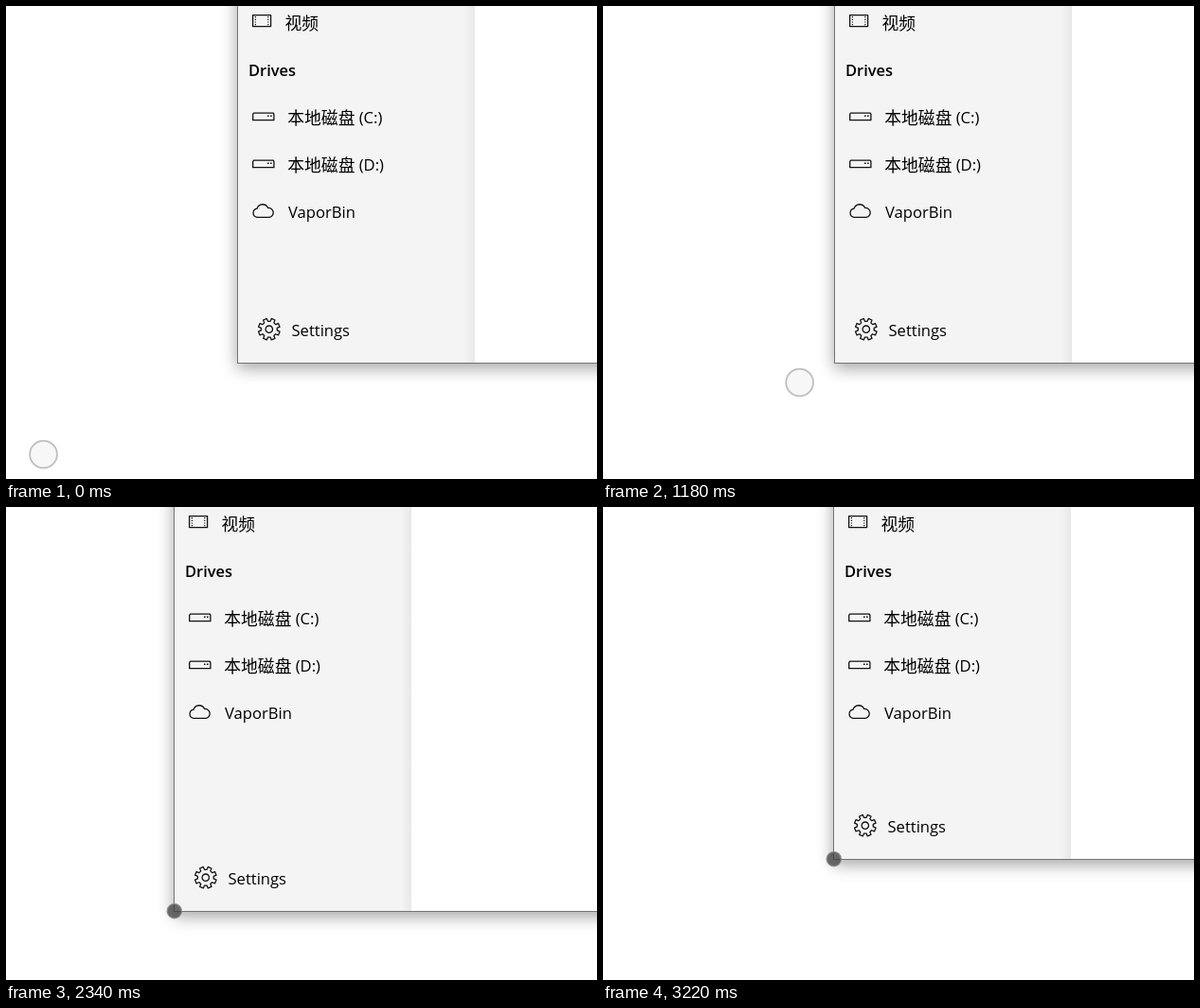
An HTML page for the animation above (3.6 s loop, 624x500 px).

```html
<!DOCTYPE html>
<html lang="zh-CN">
<head>
<meta charset="utf-8">
<title>Window resize</title>
<style>
  html, body { margin: 0; width: 100%; height: 100%; overflow: hidden; background: #fff; }
  #stage { position: relative; width: 624px; height: 500px; overflow: hidden; }
  #win {
    position: absolute; left: 0; top: -100px; width: 900px; box-sizing: border-box;
    background: #fff; border: 1px solid #747474;
    box-shadow: 0 5px 16px rgba(0, 0, 0, .36);
  }
  #side {
    width: 250px; height: 100%;
    background: linear-gradient(90deg, #f4f4f4 238px, #e8e8e8 250px);
  }
  svg { position: absolute; left: 0; top: 0; overflow: visible; }
  text { font: 16.6px "Open Sans", "Noto Sans", sans-serif; fill: #000; }
  .cjk { font: 300 17.8px "Noto Sans CJK SC", "Noto Sans CJK JP", sans-serif; }
  .head { font-size: 16.4px; font-weight: 600; }
  .icon { fill: none; stroke: #111; stroke-width: 1.3; stroke-linejoin: round; }
</style>
</head>
<body>
<div id="stage">
  <div id="win"><div id="side"></div></div>
  <svg width="624" height="500">
    <defs>
      <g id="drive" class="icon">
        <path d="M17.6 1.2H38.2L38.9 2.4V8.7H16.7V2.4Z"/>
        <path d="M32 4.2h1.6M35 4.2h1.6" stroke-width="1.5"/>
      </g>
    </defs>
    <g id="items">
      <g class="icon">
        <rect x="16.6" y="9.6" width="19" height="12"/>
        <path d="M19.4 11v10M32.8 11v10" stroke-width="1.2" stroke-dasharray="1.2 1.5"/>
      </g>
      <text class="cjk" x="50.5" y="24.6">视频</text>
      <text class="head" x="12.1" y="74">Drives</text>
      <use href="#drive" y="112"/>
      <text class="cjk" x="53.3" y="124.6">本地磁盘</text>
      <text x="128.7" y="124">(C:)</text>
      <use href="#drive" y="162"/>
      <text class="cjk" x="53.3" y="174.6">本地磁盘</text>
      <text x="128.7" y="174">(D:)</text>
      <path class="icon" d="M21 223.3A4.6 4.6 0 0 1 21 214.2A6.2 6.2 0 0 1 32.6 213.4A5 5 0 0 1 34 223.3Z"/>
      <text x="54" y="224">VaporBin</text>
      <g id="settings">
        <g class="icon" transform="translate(33.8 -35.3)">
          <path id="gear"/>
          <circle r="3.7"/>
        </g>
        <text x="57.5" y="-28">Settings</text>
      </g>
    </g>
    <circle id="dot"/>
  </svg>
</div>
<script>
  const LOOP = 3600;
  const $ = id => document.getElementById(id);
  const win = $('win'), items = $('items'), settings = $('settings'), dot = $('dot');

  // Corner of the window while dragged: time, x, y
  const drag = [
    [1840, 244, 377], [1980, 212, 402], [2340, 177.4, 427.4], [2390, 176.6, 427.8],
    [2530, 173, 430], [2880, 203.3, 403.3], [2960, 220.6, 388.4], [3220, 243, 372]
  ];

  const clamp = v => Math.min(1, Math.max(0, v));
  const mix = (a, b, p) => a + (b - a) * p;

  // Monotone cubic interpolation through one column of the key table
  function track(keys, col, t) {
    const last = keys.length - 1;
    if (t <= keys[0][0]) return keys[0][col];
    if (t >= keys[last][0]) return keys[last][col];
    const slope = i => (keys[i + 1][col] - keys[i][col]) / (keys[i + 1][0] - keys[i][0]);
    const tangent = i => {
      if (i === 0 || i === last) return 0;
      const a = slope(i - 1), b = slope(i);
      return a * b > 0 ? 2 * a * b / (a + b) : 0;
    };
    let i = 0;
    while (t > keys[i + 1][0]) i++;
    const h = keys[i + 1][0] - keys[i][0];
    const u = (t - keys[i][0]) / h, v = 1 - u;
    return v * v * (1 + 2 * u) * keys[i][col] + u * u * (1 + 2 * v) * keys[i + 1][col]
      + h * u * v * (v * tangent(i) - u * tangent(i + 1));
  }

  // The pointer's approach enters the loop already slightly under way
  const sine = t => (1 - Math.cos(Math.PI * clamp((t + 120) / 1800))) / 2;
  function approach(t) {
    const f = (sine(t) - sine(0)) / (1 - sine(0));
    const g = f - f * (1 - f) * (.55 - .38 * f);
    return [mix(39.5, 244.5, f), mix(474, 377.2, g)];
  }

  function gearPath() {
    const pts = [];
    for (let k = 0; k < 8; k++) {
      for (const [deg, r] of [[-14, 8.5], [-10, 11.5], [10, 11.5], [14, 8.5]]) {
        const a = (k * 45 + 22.5 + deg) * Math.PI / 180;
        pts.push((r * Math.cos(a)).toFixed(2) + ' ' + (r * Math.sin(a)).toFixed(2));
      }
    }
    return 'M' + pts.join('L') + 'Z';
  }

  function draw(t) {
    const x = Math.round(track(drag, 1, t)), y = Math.round(track(drag, 2, t));
    win.style.transform = `translateX(${x}px)`;
    win.style.height = y + 101 + 'px';
    items.setAttribute('transform', `translate(${x} 0)`);
    settings.setAttribute('transform', `translate(0 ${y})`);

    const [cx, cy] = t < 1700 ? approach(t) : [x + .8, y + .2];
    const p = clamp((t - 1540) / 120);
    const tone = (a, b) => Math.round(mix(a, b, p));
    const grey = (v, alpha) => `rgba(${v},${v},${v},${alpha})`;
    dot.setAttribute('cx', cx);
    dot.setAttribute('cy', cy);
    dot.setAttribute('r', mix(14.4, 7.6, p));
    dot.setAttribute('fill', grey(tone(247, 64), mix(1, .78, p)));
    dot.setAttribute('stroke', grey(tone(190, 135), mix(1, .8, p)));
    dot.setAttribute('stroke-width', mix(1.8, 1.4, p));
  }

  $('gear').setAttribute('d', gearPath());
  const start = performance.now();
  function tick() {
    draw((performance.now() - start) % LOOP);
    requestAnimationFrame(tick);
  }
  draw(0);
  requestAnimationFrame(tick);
</script>
</body>
</html>
```
